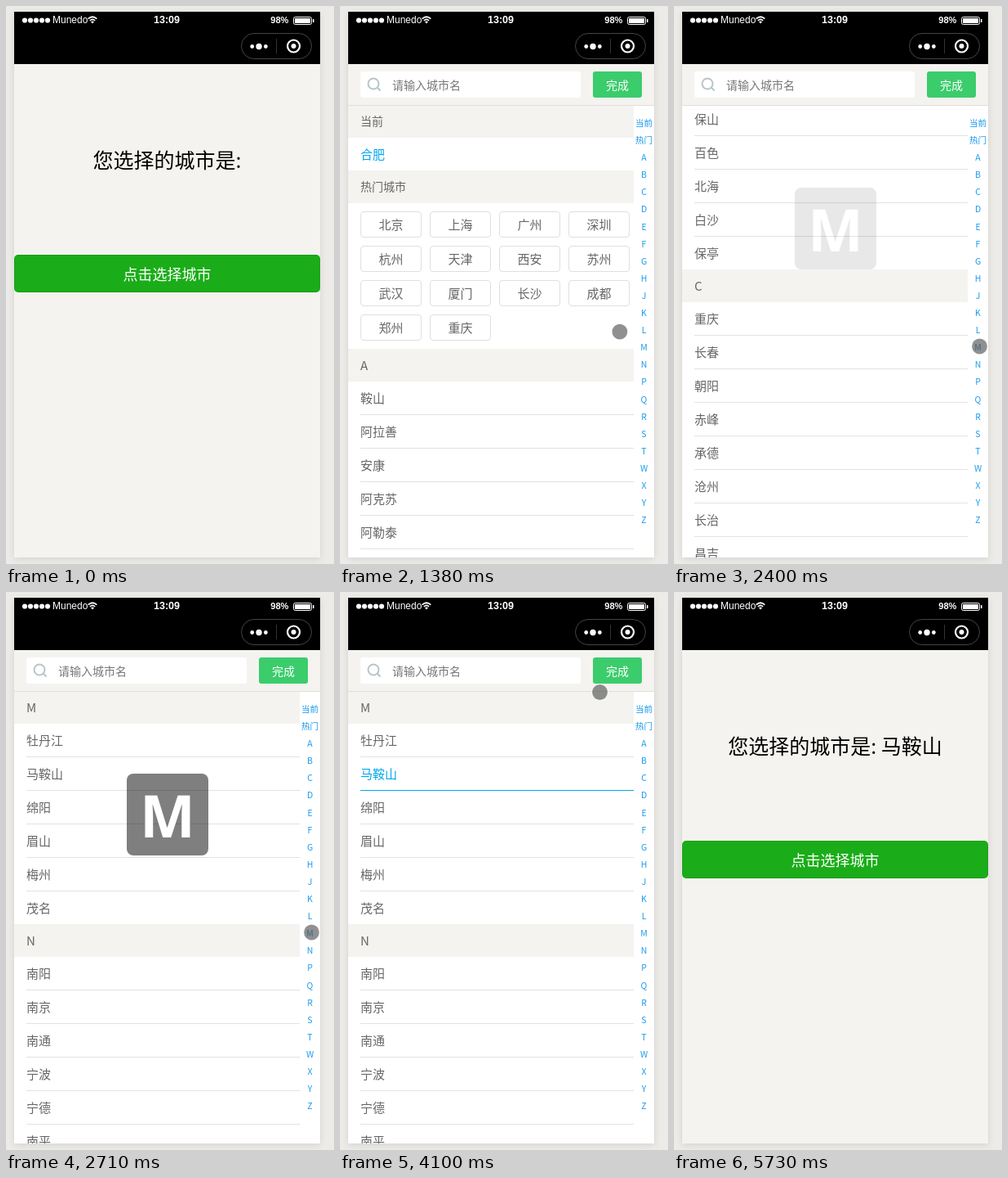
An HTML page for the animation above (6.08 s loop, 402 px wide and 682 px high).

```html
<!DOCTYPE html>
<html lang="zh-CN">
<head>
<meta charset="utf-8">
<title>城市选择</title>
<style>
  html, body { margin: 0; width: 100%; height: 100%; overflow: hidden; background: #edebe8; }
  body { position: relative; color: #666; font: 350 15px "Noto Sans CJK SC", "Noto Sans CJK", "Noto Sans", sans-serif; }
  body div, svg { position: absolute; box-sizing: border-box; white-space: pre; }
  #phone { left: 10px; top: 7px; width: 375px; height: 667px; background: #f4f3ef; box-shadow: 0 2px 8px rgba(0,0,0,.1); }
  #top { left: 0; top: 0; }
  #top text { font-family: "Liberation Sans", Arial, sans-serif; }
  #home, #picker { left: 0; top: 0; width: 402px; height: 682px; }
  #title { left: 10px; top: 162px; width: 375px; font-size: 25px; font-weight: 300; line-height: 50px; text-align: center; color: #000; }
  #open { left: 10px; top: 304px; width: 375px; height: 46px; border-radius: 5px; background: #1aad19;
    box-shadow: inset 0 0 0 1px rgba(0,0,0,.08); color: #fff; font-size: 18px; line-height: 46px; text-align: center; }
  #open.down { background: #179b16; color: rgba(255,255,255,.6); }
  #toast { left: 148px; top: 293px; width: 98px; height: 109px; border-radius: 5px; background: rgba(17,17,17,.7);
    color: #fff; font-size: 13px; font-weight: 500; text-align: center; line-height: 20px; padding-top: 72px; }
  #spin { left: 31px; top: 31px; }
  #bar { left: 10px; top: 71px; width: 375px; height: 51px; background: #f4f3ef; border-bottom: 1px solid #e0dfdc; font-size: 14px; line-height: 32px; }
  #field { left: 15px; top: 9px; width: 270px; height: 32px; border-radius: 3px; background: #fff; padding-left: 39px; color: #777; }
  #done { left: 300px; top: 9px; width: 60px; height: 32px; border-radius: 3px; background: #3bcc6c; color: #fff; text-align: center; }
  #view { left: 10px; top: 121px; width: 375px; height: 553px; overflow: hidden; background: #fff; }
  #list { left: 0; top: 0; width: 350px; }
  #list div { position: relative; }
  .head { height: 40px; padding-left: 15px; background: #f4f3ef; line-height: 39px; }
  .cn { font-size: 14px; }
  .row { height: 41px; margin-left: 15px; border-bottom: 1px solid #e2e2e2; line-height: 40px; }
  .row.last { height: 40px; border: 0; }
  .row.on { color: #02a6ed; border-color: #02a6ed; }
  #list .hot { height: 178px; padding: 10px 0 0 15px; display: grid; grid-template-columns: repeat(4, 75px); grid-auto-rows: 32px; gap: 10px; }
  .hot div { border: 1px solid #dfdfdf; border-radius: 4px; text-align: center; line-height: 30px; }
  #index { left: 350px; top: 11px; width: 25px; color: #1a9aec; font-size: 10.5px; line-height: 21.09px; text-align: center; }
  #hint { left: 148px; top: 222px; width: 100px; height: 100px; border-radius: 8px; background: rgba(0,0,0,.5);
    color: #fff; font: bold 72px/100px "Open Sans", "Noto Sans", sans-serif; text-align: center; }
  #dot { left: -12px; top: -12px; width: 24px; height: 24px; }
</style>
</head>
<body>
<div id="phone"></div>

<div id="home">
  <div id="title"></div>
  <div id="open">点击选择城市</div>
  <div id="toast"><svg id="spin" width="36" height="36" viewBox="-18 -18 36 36"></svg>获取数据...</div>
</div>

<div id="picker">
  <div id="view"><div id="list"></div><div id="index"></div></div>
  <div id="bar">
    <div id="field">请输入城市名<svg style="left:0;top:0" width="36" height="32" fill="none" stroke="#b6c6c8" stroke-width="2">
      <circle cx="16" cy="15" r="6.5"/><path d="M20.8 19.8 24.5 23.5"/></svg></div>
    <div id="done">完成</div>
  </div>
  <div id="hint">M</div>
</div>

<svg id="top" width="402" height="72" fill="#fff">
  <path d="M10 7H385V71H10Z" fill="#000"/>
  <g id="signal"></g>
  <text x="57" y="21" font-size="12">Munedo</text>
  <path d="M100.7 15.6Q106 10.9 111.3 15.6M102.9 17.9Q106 15 109.1 17.9" fill="none" stroke="#fff" stroke-width="1.7"/>
  <path d="M104 19.3Q106 17.7 108 19.3L106 21.5Z"/>
  <text x="197" y="21" font-size="12.5" font-weight="bold" text-anchor="middle">13:09</text>
  <text x="324.3" y="21" font-size="11" font-weight="bold">98%</text>
  <rect x="352.5" y="13.5" width="22" height="9" rx="2" fill="none" stroke="#fff"/>
  <path d="M354 15H373V21H354ZM376 16H377.5V20H376Z"/>
  <rect x="288.5" y="33.5" width="86" height="31" rx="15.5" fill="none" stroke="#444"/>
  <path d="M331 40H332V58H331Z" fill="#333"/>
  <circle cx="301.7" cy="49.5" r="2.4"/><circle cx="310" cy="49.5" r="3.7"/><circle cx="318.3" cy="49.5" r="2.4"/>
  <circle cx="352.5" cy="49" r="7.5" fill="none" stroke="#fff" stroke-width="2.2"/><circle cx="352.5" cy="49" r="3"/>
</svg>

<svg id="dot" viewBox="-12 -12 24 24">
  <g id="idle"><circle r="9.9" fill="none" stroke="#fff" stroke-opacity=".55"/><circle r="9.4" fill="#464646" fill-opacity=".6"/></g>
  <circle id="press" r="10.5" fill="none" stroke="#909090" stroke-opacity=".65" stroke-width="2"/>
</svg>

<script>
const $ = id => document.getElementById(id);
const LOOP = 6080, STEP = 80;

const cities = {
  A: '鞍山 阿拉善 安康 阿克苏 阿勒泰 阿里 安阳 安庆 安顺 阿坝 澳门',
  B: '北京 保定 包头 巴彦淖尔 本溪 白山 白城 蚌埠 亳州 滨州 宝鸡 白银 博尔塔拉 巴音郭楞 巴中 毕节 保山 百色 北海 白沙 保亭',
  C: '重庆 长春 朝阳 赤峰 承德 沧州 长治 昌吉 常州 滁州 巢湖 池州 长沙 常德 郴州 成都 楚雄 崇左 潮州 澄迈 昌江',
  D: '大庆 大兴安岭 大连 丹东 大同 东营 德州 定西 德阳 达州 大理 德宏 迪庆 东莞 儋州 东方 定安',
  E: '鄂尔多斯 鄂州 恩施',
  F: '抚顺 阜新 阜阳 抚州 福州 佛山 防城港',
  G: '广州 固原 甘南 果洛 赣州 广元 广安 甘孜 贵阳 桂林 贵港',
  H: '哈尔滨 鹤岗 黑河 呼和浩特 呼伦贝尔 葫芦岛 邯郸 衡水 菏泽 汉中 哈密 和田 海东 海北 黄南 海南 海西 鹤壁 淮安 黄石 黄冈 杭州 湖州 合肥 淮南 淮北 黄山 衡阳 怀化 红河 惠州 河源 贺州 河池 海口',
  J: '佳木斯 鸡西 吉林 锦州 晋城 晋中 济南 济宁 嘉峪关 金昌 酒泉 焦作 济源 荆门 荆州 嘉兴 金华 九江 景德镇 吉安 江门 揭阳',
  K: '克拉玛依 克孜勒苏 喀什 开封 昆明',
  L: '辽源 辽阳 廊坊 临汾 吕梁 聊城 莱芜 临沂 兰州 陇南 临夏 拉萨 林芝 洛阳 漯河 连云港 丽水 六安 娄底 龙岩 泸州 乐山 凉山 六盘水 丽江 临沧 柳州 来宾 临高 乐东 陵水',
  M: '牡丹江 马鞍山 绵阳 眉山 梅州 茂名',
  N: '南阳 南京 南通 宁波 宁德 南平 南昌 南充 内江 怒江 南宁 那曲'
};
const hot = '北京 上海 广州 深圳 杭州 天津 西安 苏州 武汉 厦门 长沙 成都 郑州 重庆';

function add(parent, cls, text = '') {
  const el = document.createElement('div');
  el.className = cls;
  el.textContent = text;
  return parent.appendChild(el);
}

const list = $('list'), heads = {};
let picked;
add(list, 'head cn', '当前');
add(list, 'row last on', '合肥');
add(list, 'head cn', '热门城市');
const grid = add(list, 'hot');
hot.split(' ').forEach(name => add(grid, '', name));
for (const [letter, names] of Object.entries(cities)) {
  heads[letter] = add(list, 'head', letter);
  names.split(' ').forEach((name, i, all) => {
    const row = add(list, i === all.length - 1 ? 'row last' : 'row', name);
    if (name === '马鞍山') picked = row;
  });
}
$('index').textContent = ['当前', '热门', ...'ABCDEFGHJKLMNPQRSTWXYZ'].join('\n');

const repeat = (n, part) => Array.from({ length: n }, (_, i) => part(i)).join('');
$('signal').innerHTML = repeat(5, i => `<circle cx="${23 + i * 7}" cy="17.5" r="3.1"/>`);
$('spin').innerHTML = repeat(12, i => `<path d="M0 -9V-14" stroke="#fff" stroke-width="2.6" stroke-linecap="round"
  opacity="${1 - (12 - i) % 12 * .055}" transform="rotate(${i * 30})"/>`);

const ramp = (t, a, b) => Math.min(1, Math.max(0, (t - a) / (b - a)));
const within = (t, a, b) => t >= a && t < b;

// Pointer moves; a higher brake means a softer stop
const moves = [
  { from: 0, to: 590, x: 211.5, y: 323.5, brake: 2 },
  { from: 880, to: 2020, x: 374.5, y: 416, brake: 3 },
  { from: 2710, to: 3410, x: 132, y: 231.5, brake: 1 },
  { from: 3570, to: 4080, x: 318.5, y: 122.5, brake: 1.7 },
  { from: 4100, to: 4410, x: 330, y: 99.5, brake: 1.5 },
  { from: 4900, to: 5500, x: 272, y: 500, brake: 1 },
  { from: 5500, to: 5700, x: 345, y: 690, brake: 1 }
];

function pointer(t) {
  let x = 288, y = 595;
  for (const m of moves) {
    const p = 1 - (1 - ramp(t, m.from, m.to)) ** m.brake;
    x += (m.x - x) * p;
    y += (m.y - y) * p;
  }
  return [x, y];
}

// The jump to M passes C on the way
const passC = heads.C.offsetTop - 201, toM = heads.M.offsetTop - passC;
const scroll = t => passC * ramp(t, 2320, 2400) + toM * ramp(t, 2400, 2620);

const presses = [[680, 880], [2250, 2320], [3490, 3570], [4560, 4650]];
const toggle = (el, on) => { el.style.display = on ? '' : 'none'; };

function draw(t) {
  const step = t - t % STEP;
  const picking = within(t, 1050, 4800), busy = within(t, 820, 1050);
  toggle($('home'), !picking);
  toggle($('picker'), picking);
  toggle($('toast'), busy);
  $('title').textContent = '您选择的城市是:' + (t >= 4800 ? ' 马鞍山' : '');
  $('open').classList.toggle('down', busy);
  $('spin').style.transform = `rotate(${Math.floor(ramp(t, 820, 1820) * 12) * 30}deg)`;

  list.style.transform = `translateY(${-Math.round(scroll(step))}px)`;
  $('hint').style.opacity = ramp(step, 2320, 2620) ** 1.3 * (1 - ramp(step, 2860, 3010));
  picked.classList.toggle('on', t >= 3570);

  const [x, y] = pointer(step);
  const seen = within(t, 70, 5730), down = presses.some(([a, b]) => within(t, a, b));
  $('dot').style.transform = `translate(${x}px, ${y}px)`;
  toggle($('idle'), seen && !down);
  toggle($('press'), seen && down);
}

const start = performance.now();
function loop() {
  draw((performance.now() - start) % LOOP);
  requestAnimationFrame(loop);
}
loop();
</script>
</body>
</html>
```
